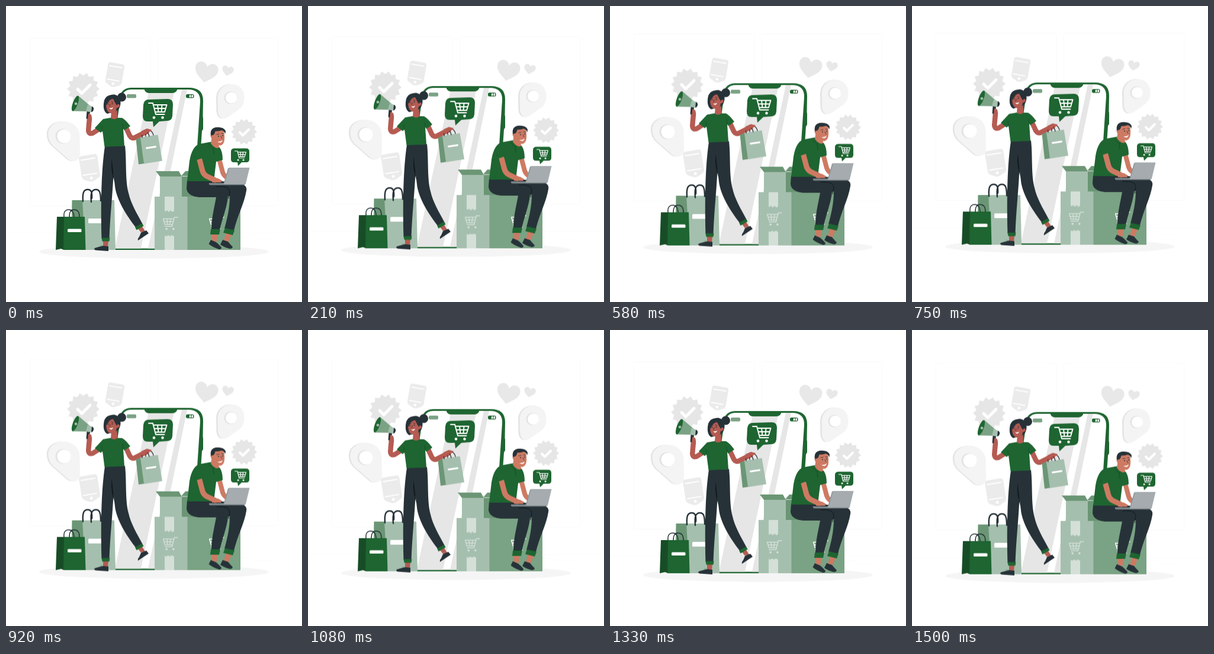
An HTML page for the animation above (1540 ms loop, 500x500 px).

```html
<!DOCTYPE html>
<html lang="en">
<head>
<meta charset="utf-8">
<title>Online shopping</title>
<style>
  html, body { margin: 0; width: 100%; height: 100%; overflow: hidden; background: #fff; }
  svg { display: block; width: 100%; height: 100%; }
  .deep { fill: #1e6531; }
  .dim { fill: #174d26; }
  .mid { fill: #7aa284; }
  .side { fill: #6b9675; }
  .pale { fill: #a5bfae; }
  .ink { fill: #263238; }
  .skin { fill: #b55b52; }
  .tan { fill: #ce7a63; }
  .white { fill: #fff; }
  .soft { fill: #e6e6e6; }
  .light { fill: #f4f4f4; }
  .shade { fill: #e3e3e3; }
  .line { fill: none; stroke-linecap: round; stroke-linejoin: round; }
</style>
</head>
<body>
<svg viewBox="0 0 500 500">
  <defs>
    <g id="cart">
      <path class="line" stroke="currentColor" stroke-width="1.900" d="M0 0H7L12 19H26.500M8 3H30.500L27 15H11M9.500 9H28.500M15 3L16.500 15M22.500 3L21.500 15"/>
      <circle cx="9" cy="24.500" r="2.300" fill="currentColor"/>
      <circle cx="23.500" cy="24.500" r="2.300" fill="currentColor"/>
    </g>
    <path id="pinA" d="M69 217C68 204 80 195 95 195C111 195 122 206 122 220L122.500 250C122 262 111 265 103 259L79 238C72 232 69 225 69 217Z"/>
    <path id="pinB" d="M400 155C400 141 391 132 379 132C365 132 355 142 355 156L355.500 178C357 190 364 193 372 188L392 174C398 169 400 162 400 155Z"/>
    <path id="heart" d="M0 17.500C-7 11-19.500 5-19.500-6C-19.500-18-4-20 0-9C4-20 19.500-18 19.500-6C19.500 5 7 11 0 17.500Z"/>
    <g id="tag">
      <path fill="#ebebeb" d="M-10-20H10Q14-20 14-16V11Q14 14 11 16L3 20Q0 21-3 20L-11 16Q-14 14-14 11V-16Q-14-20-10-20Z"/>
      <path class="line" stroke="#fff" stroke-width="1.800" d="M-11-14H10M-11 9H9"/>
      <circle class="white" cy="15" r="2.200"/>
    </g>
  </defs>

  <g id="scene">
    <!-- room -->
    <g fill="none" stroke="#fafafa">
      <rect x="40" y="54.500" width="204" height="283" rx="4"/>
      <rect x="256" y="54.500" width="204" height="283" rx="4"/>
      <path stroke="#fcfcfc" d="M0 383.500H500M396 390H415M417 395.500H448"/>
    </g>
    <ellipse cx="250" cy="415" rx="194" ry="11.500" fill="#f5f5f5"/>

    <!-- floating icons -->
    <use href="#tag" transform="translate(183.500 116.500) rotate(10)"/>
    <use href="#tag" transform="translate(141.500 274) rotate(-9) scale(1.120)"/>
    <g fill="#e8e8e8">
      <use href="#heart" transform="translate(338 112) rotate(12)"/>
      <use href="#heart" transform="translate(374.500 109.500) rotate(12) scale(.5)"/>
    </g>
    <g class="soft">
      <path data-star="130.500 140 27.500 22.500 14"/>
      <path data-star="402 212.500 22 18 14"/>
    </g>
    <path class="line" stroke="#fff" stroke-width="5" d="M121 140.500L128 147.500L142 133.500"/>
    <path class="line" stroke="#fff" stroke-width="4" d="M395 213.500L400 218.500L410 208.500"/>
    <use href="#pinA" class="shade"/>
    <use href="#pinA" class="light" x="2.500"/>
    <circle cx="96" cy="220" r="12.500" class="shade"/>
    <circle cx="98" cy="220" r="11.500" class="white"/>
    <use href="#pinB" class="shade"/>
    <use href="#pinB" class="light" x="2.500"/>
    <circle cx="379" cy="155" r="10.500" class="shade"/>
    <circle cx="380.500" cy="155" r="9.500" class="white"/>

    <!-- phone -->
    <path class="deep" d="M211 138H309Q333 138 333 160L332.500 187L333 189V208L331 211L330 226L322 345L306 412H178Q166 412 167 399L171 290L189 165Q192 138 211 138Z"/>
    <path class="white" d="M211 141H307Q329 141 328 162L321.500 260L305 409.500H178Q170 409 170 398L174 290L192 165Q195 141 211 141Z"/>
    <path class="soft" d="M241 145H284L228 409.500H184ZM297 141H306L251 409.500H240Z"/>
    <path class="deep" d="M233 139H290Q288 147 281 147H241Q235 147 233 139Z"/>
    <rect class="mid" x="204" y="149" width="16" height="6.500" rx="2"/>
    <rect class="deep" x="304" y="149" width="13.500" height="6.500" rx="2.500"/>
    <path class="white" d="M310 150.300H312.300V154.200H309.700ZM313.600 150.300H316V154.200H313.300Z"/>
    <path class="deep" d="M241 158L273 157Q282 157 282 166L281 186Q280 194 272 194L259 195L249 204.500L248 195L239 195Q231 195 231 186L232 167Q233 158 241 158Z"/>
    <use href="#cart" x="241" y="164" color="#fff"/>

    <!-- boxes -->
    <path class="side" d="M296 288H318V323H296ZM253 279H292L297 288H260ZM296 287L303 279H318V288Z"/>
    <path class="pale" d="M260 288H297V323H260Z"/>
    <path class="mid" d="M306 322H396V412H306Z"/>
    <path class="pale" d="M251 322H306.500V412H251Z"/>
    <path fill="#d3dfd7" d="M268 322H284V346L281 348L278 345L275 348L272 345L270 347L268 346ZM268 388L271 389L274 387L277 389L280 387L284 389V412H268Z"/>
    <use href="#cart" transform="translate(290 357) scale(-.8 .8)" color="#d3dfd7"/>
    <use href="#cart" transform="translate(368 357) scale(-.8 .8)" color="#fff"/>

    <!-- standing bags -->
    <path class="side" d="M111.500 328H131L135 412H110Z"/>
    <path class="pale" d="M129 328H183L185 412H134Z"/>
    <path class="line" stroke="#263238" stroke-width="2.400" d="M130 330C129 316 131 310 138 310C145 310 145.500 317 145 325M144 331C142.500 316 145 310 152 310C158 310 160 315 160 329"/>
    <rect class="white" x="139" y="359" width="24" height="8" rx="1.500"/>
    <path class="dim" d="M86 356H99L98 412L93 410L84 412Z"/>
    <path class="deep" d="M98 356H133L134.500 412H97Z"/>
    <path class="line" stroke="#263238" stroke-width="1.500" d="M98 356C97 347 101 344 106 344C112 344 114.500 348 115 356M107 356C107 347 110 344 115 344C121 344 124 348 124 356"/>
    <rect class="white" x="104" y="376.500" width="23.500" height="5.500" rx="1.500"/>

    <!-- woman -->
    <g>
      <path class="skin" d="M164 395H173L172 408H164ZM222 375L229 371L236 382L230 385Z"/>
      <path class="ink" d="M163.500 405L173 406V414L151 412.500Q147 410 151 408.500ZM223 396Q222 393 225 390L228 383L237 379L241 384Z"/>
      <path class="line" stroke="#7aa284" d="M159 404L163 405M228 383L230 380"/>
      <path class="ink" d="M167 237L201 236C204 262 201 294 207 316C211 334 221 350 230.500 368L220 375C206 357 189 332 184.500 308L181.500 284C180 320 176 352 174.500 393H161.500C160 330 161 278 167 237Z"/>
      <path fill="#10191e" d="M178.500 258C177 272 179 284 183 296C181 282 180 270 178.500 258Z"/>
      <path class="deep" d="M161.500 391.500H175.500L174.500 397.500H162.500ZM218 373.500L230 367L232.500 371.500L220.500 378.500Z"/>
      <path class="line" stroke="#b55b52" stroke-width="8.500" d="M157 208L146 215Q138 217 139.500 206L141 190M203 206L209 219Q213 226 220 221L238 212"/>
      <path class="deep" d="M164 191L178 188.500L196 189Q201 191 210 203L200 210L198 207L200 236.500L166.500 238L163 211L160 214L150 206Z"/>
      <path class="line" stroke="#174d26" stroke-width=".8" d="M162 203L163 212M197 199L198 208"/>
      <path class="skin" d="M178 176L187.500 174L188 189Q184 193 177 189.500Z"/>
      <circle class="ink" cx="195.500" cy="154" r="7.500"/>
      <path class="ink" d="M178 150C188 147 196 157 193 168Q191 176 185 178L171 182C164 178 164 168 166 159Q169 151 178 150Z"/>
      <path class="skin" d="M170 160Q176 154 182 157Q184 164 187 167Q191 164 192 168Q191 172 187 172L186 177Q182 183 175 180.500Q167 176 170 160Z"/>
      <path class="ink" d="M168 162Q173 150 182 152L191 163L187 168L181 157Q175 156 169.500 168Z"/>
      <path class="white" d="M174 172.500Q178 173 181 171Q179 177 174 172.500Z"/>
      <circle class="ink" cx="172.500" cy="165.500" r=".9"/>
      <circle class="ink" cx="179.500" cy="165" r=".9"/>
      <path class="line" stroke="#263238" stroke-width=".8" d="M171 162.500L174 162M178 161.500L181 162.500M176 166L175 169.500"/>
    </g>

    <!-- megaphone -->
    <path class="mid" d="M122 151.500L142 168.500L139 178L112 177.500Z"/>
    <path class="pale" d="M138 166.500L147 170.500L144 179.500L135 177.500Z"/>
    <ellipse class="deep" cx="117" cy="164.500" rx="4.200" ry="13.700" transform="rotate(20 117 164.500)"/>
    <circle class="pale" cx="118" cy="165" r="2.300"/>
    <path class="ink" d="M145 169.500Q149 171 148 175Q147 179 144 179ZM136.500 178L142 179L140 190.500H135.500Z"/>
    <path class="skin" d="M139 182L143.500 183Q146 187 144.500 194L138 193Z"/>

    <!-- carried bag -->
    <path class="side" d="M219.500 225L228 222L234 266L224 267.500Z"/>
    <path class="pale" d="M227 222L256.500 217.500L264 261.500L233 266.500Z"/>
    <path class="line" stroke="#263238" stroke-width="1.300" d="M230 222C227 210 239 207 242 220M236 220C234 208 246 206 249 218"/>
    <path class="line" stroke="#fff" stroke-width="3" d="M237.500 240L252.500 237.800"/>
    <path class="skin" d="M229 211L238 207L246 209L244 212L240 212L236 216L229 218Z"/>

    <!-- man -->
    <g>
      <path class="line" stroke="#ce7a63" stroke-width="8" d="M361 262L366 281Q368 287 375 291"/>
      <path class="tan" d="M347 384H357L356 397L349 399ZM371 384L381 385L377 397L368 398Z"/>
      <path class="ink" d="M346 395L355 399Q360 403 364 408Q364 411 360 411Q350 408 342.500 402ZM366 395L375 398Q379 403 383 407Q382 410 378 410Q369 408 362 403Z"/>
      <path class="ink" d="M306 294L357 295L396 300Q408 303 406 312C403 332 391 354 385 379L369 376C375 354 378 338 378 321L375 322C373 342 364 362 361 379H347C347 358 352 340 355 323L326 323Q306 321 305 308Z"/>
      <path class="line" stroke="#10191e" stroke-width="1" d="M356 305Q378 303 378 315L376 325"/>
      <path class="deep" d="M346 377H362L360 386H345ZM370 375L386 379L383 387L367 383Z"/>
      <path class="deep" d="M327 233L346 229.500L361 239Q366 246 366 260L355 263L351 296H306L310 262Q314 237 327 233Z"/>
      <path class="line" stroke="#174d26" stroke-width="1" d="M322 247L319 256M342 233L350 241L354 237M350 241L351 250"/>
      <path class="line" stroke="#ce7a63" stroke-width="9" d="M327 260L332 279Q334 285 340 288L353 294"/>
      <path class="tan" d="M349 291L358 291L365 295L363 298H348ZM372 288L379 291V297H369Z"/>
      <path class="deep" d="M319 243Q323 239 330 244L334 256L320 261Z"/>
      <path class="tan" d="M348 219L358 224L360 239Q354 243 346 232Z"/>
      <path class="tan" d="M350 212Q360 207 368 211Q370 221 368.500 229Q365 239 356 234L350 227Q343 221 347 216Z"/>
      <path class="ink" d="M346 219Q344 207 354 205Q367 203.500 371 211L370.500 216Q368 210 364 210Q358 212 353.500 211.500Q352 218 349.500 218Z"/>
      <path class="white" d="M357 229Q363 229.500 366 226.500Q364 233.500 357 229Z"/>
      <circle class="ink" cx="359" cy="220" r=".9"/>
      <circle class="ink" cx="366" cy="219" r=".9"/>
      <path class="line" stroke="#263238" stroke-width=".8" d="M356 217L360 216M364 215.500L367 215.500M363 220L365 224"/>
    </g>

    <!-- laptop -->
    <path fill="#8c9498" d="M375 274L378 273L374 300L368 299Z"/>
    <path fill="#a5abae" d="M377 273H411.500L405 300H369Z"/>
    <path fill="#7d868a" d="M343 299H405Q404 302.500 400 302.500H345Q342 302 343 299Z"/>
    <path fill="#a5abae" d="M369 298.500H405V301H367Z"/>

    <!-- message -->
    <path class="deep" d="M386 240.500H406Q411 240.500 411 246V259Q411 264 406 264H398L392 270L391 264H385Q380 264 380 259V246Q380 240.500 386 240.500Z"/>
    <use href="#cart" transform="translate(386.500 245) scale(.62)" color="#fff"/>
  </g>
</svg>
<script>
  // Starburst with two tips straddling the top.
  const starPath = (cx, cy, outer, inner, tips) =>
    "M" + Array.from({ length: tips * 2 }, (_, i) => {
      const a = (i + 1) * Math.PI / tips - Math.PI / 2;
      const r = i % 2 ? inner : outer;
      return (cx + r * Math.cos(a)).toFixed(2) + " " + (cy + r * Math.sin(a)).toFixed(2);
    }).join("L") + "Z";

  for (const el of document.querySelectorAll("[data-star]"))
    el.setAttribute("d", starPath(...el.dataset.star.split(" ").map(Number)));

  // The whole scene floats up and down at constant speed.
  const LOOP = 1540;
  const steps = [[0, 0], [710, -9.22], [1480, 0.78], [LOOP, 0]];
  document.getElementById("scene").animate(
    steps.map(([t, y]) => ({ offset: t / LOOP, transform: `translateY(${y}px)` })),
    { duration: LOOP, iterations: Infinity, easing: "linear" }
  );
</script>
</body>
</html>
```
